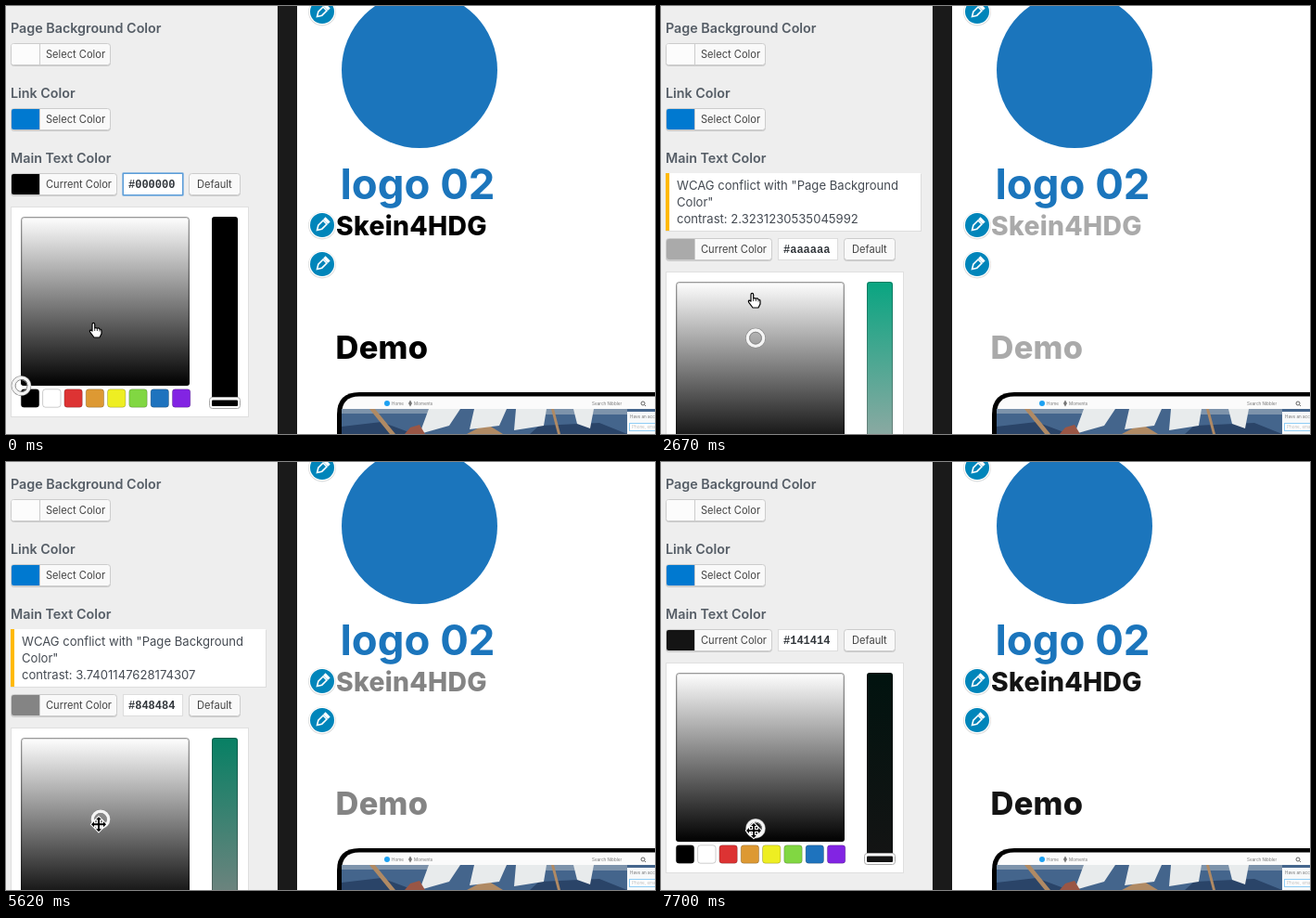
These frames come from a looping animation (700 px wide and 461 px high, 8000 ms). An HTML page:

```html
<!DOCTYPE html>
<html>
<head>
<meta charset="utf-8">
<title>Colour picker contrast check</title>
<style>
html, body { margin: 0; width: 100%; height: 100%; overflow: hidden; background: #fff; }
svg { display: block; }
text { font-family: Inter, "Open Sans", sans-serif; white-space: pre; }
.label { font-size: 14.3px; font-weight: 600; fill: #555d66; }
.btn { font-size: 11.1px; fill: #444; }
.note { font-size: 13.1px; fill: #444a52; }
.title { font-weight: 800; letter-spacing: .3px; }
.tiny { font-size: 4.6px; fill: #777; }
#hex { font: bold 12px "Liberation Mono", monospace; fill: #32373c; }
</style>
</head>
<body>
<svg width="700" height="461" viewBox="0 0 700 461">
  <defs>
    <linearGradient id="grey" x2="0" y2="1">
      <stop stop-color="#fff"/><stop offset="1"/>
    </linearGradient>
    <linearGradient id="sat" x2="0" y2="1">
      <stop id="satTop"/><stop id="satEnd" offset="1"/>
    </linearGradient>
    <clipPath id="noteClip"><rect id="noteBox" x="0" y="179" width="290"/></clipPath>
    <clipPath id="photo"><path d="M362 434H700V461H362Z"/></clipPath>
    <g id="edit">
      <circle r="15" fill="#ddd" cy=".5"/>
      <circle r="14.3" fill="#fff"/>
      <circle r="13" fill="#0085ba"/>
      <g transform="translate(.2 -.2) rotate(45)" fill="none" stroke="#fff" stroke-width="1.6">
        <path d="M-2.8-4V3.4L0 8 2.8 3.4V-4Z"/>
        <path d="M-2.8-5.8V-7.6H2.8V-5.8Z" fill="#fff"/>
      </g>
    </g>
  </defs>

  <path fill="#eee" d="M0 0H293V461H0Z"/>
  <path fill="#ddd" d="M292 0H293V461H292Z"/>
  <path fill="#1a1a1a" d="M293 0H314V461H293Z"/>

  <g id="side"></g>

  <g clip-path="url(#noteClip)">
    <path fill="#ddd" d="M5 181H281V243H5Z"/>
    <path fill="#fff" d="M5 180H280V242H5Z"/>
    <path fill="#ffb900" d="M5 180H9V242H5Z"/>
    <text class="note" x="17" y="198">WCAG conflict with "Page Background</text>
    <text class="note" x="17" y="216">Color"</text>
    <text class="note" x="17" y="234" id="contrast"></text>
  </g>

  <g id="picker">
    <g id="row"></g>
    <rect id="glow" x="125.5" y="179.5" width="66" height="25" rx="1" fill="none" stroke="#5b9dd9" stroke-opacity=".6"/>
    <rect id="input" x="126.5" y="180.5" width="64" height="23" fill="#fff"/>
    <text id="hex" x="132" y="196"></text>
    <path id="caret" d="M183.5 186V199" stroke="#000"/>
    <rect x="5.5" y="216.5" width="256" height="226" fill="#fff" stroke="#dfdfdf"/>
    <rect x="16" y="227" width="182" height="182" rx="3" fill="url(#grey)"/>
    <rect x="16.5" y="227.5" width="181" height="181" rx="3" fill="none" stroke="#000" stroke-opacity=".4"/>
    <rect x="17.5" y="228.5" width="179" height="179" rx="2" fill="none" stroke="#000" stroke-opacity=".12"/>
    <rect x="222" y="227" width="28" height="205" rx="3" fill="url(#sat)"/>
    <rect x="222.5" y="227.5" width="27" height="204" rx="3" fill="none" stroke="#000" stroke-opacity=".25"/>
    <g id="palette"></g>
    <rect x="219.5" y="421.5" width="33" height="12" rx="3" fill="#fff" stroke="#aaa"/>
    <rect id="knob" x="222" y="424.5" width="28" height="6.5" rx="1"/>
    <g id="ring" fill="none">
      <circle r="9.6" stroke="#888" stroke-width="2.4"/>
      <circle r="8.6" stroke="#f4f4f4" stroke-width="3.4"/>
      <circle r="6.4" stroke="#888"/>
    </g>
  </g>

  <circle cx="446" cy="69" r="84" fill="#1b75bc"/>
  <text x="360.5" y="208" font-size="45.5" font-weight="700" fill="#1b75bc">logo 02</text>
  <g id="titles">
    <text class="title" x="356" y="247" font-size="28.3">Skein4HDG</text>
    <text class="title" x="355.5" y="379.5" font-size="34.4">Demo</text>
  </g>
  <use href="#edit" x="341" y="6"/>
  <use href="#edit" x="341" y="236"/>
  <use href="#edit" x="341" y="278"/>

  <path d="M357 461V440Q357 416 381 416H700V461Z"/>
  <path fill="#fbfbfb" d="M362 461V440Q362 420.5 381 420.5H700V461Z"/>
  <circle cx="411" cy="428" r="3" fill="#1da1f2"/>
  <text class="tiny" x="416" y="429.5">Home</text>
  <path fill="#777" d="M434 428 436 424.5 438 428 436 431.5Z"/>
  <text class="tiny" x="440" y="429.5">Moments</text>
  <text class="tiny" x="632" y="429.5">Search Nibbler</text>
  <path d="M688.5 429.5 690 431" stroke="#666"/>
  <circle cx="687" cy="428" r="2" fill="none" stroke="#666"/>
  <g clip-path="url(#photo)">
    <path fill="#44658c" d="M362 434H700V461H362Z"/>
    <path fill="#7d93ab" d="M362 434H460V439H362ZM575 434H670V440H575Z"/>
    <path fill="#2a4468" d="M362 453 405 448 440 461H362ZM575 452 640 449 670 461H565Z"/>
    <path fill="#b08a64" d="M398 434 420 461H414L392 434ZM497 461 518 450 536 461ZM588 434H591L598 461H595Z"/>
    <path fill="#e8ebec" d="M456 434H490L478 452 446 461ZM505 434H540L532 452 500 456ZM550 434H583L580 452 548 457ZM612 434H634L630 455 616 450Z"/>
    <path fill="#9a5645" d="M436 454 446 451 452 461H430Z"/>
    <path fill="#f7f9fa" d="M670 437H700V461H670Z"/>
  </g>
  <text class="tiny" x="673" y="444">Have an account?</text>
  <rect x="672.5" y="449.5" width="40" height="8" fill="#fff" stroke="#8ecdf5"/>
  <text class="tiny" x="675" y="455" fill-opacity=".5">Phone, email</text>

  <g id="cursor">
    <g id="hand" stroke="#000" stroke-width="1.2" stroke-linejoin="round">
      <path fill="#fff" d="M-4 1V-6Q-4-7.6-2.7-7.6T-1.3-6V-2Q0-3 1.4-1.8 3-2.6 4-1 6-1 6 1V4L4 8H-2L-6.2 2.4Q-7.2.6-6 .1-5 0-4 1Z"/>
      <path d="M-1.3-2V1M1.4-1.8V1M4-1V1.5" stroke-width=".8"/>
    </g>
    <path id="move" stroke="#fff" stroke-width="2" paint-order="stroke" d="M0-8 3-5H1V-1H5V-3L8 0 5 3V1H1V5H3L0 8-3 5H-1V1H-5V3L-8 0-5-3V-1H-1V-5H-3Z"/>
  </g>
</svg>
<script>
const $ = id => document.getElementById(id);
const set = (id, attrs) => {
  for (const key in attrs) $(id).setAttribute(key, attrs[key]);
};

const button = (x, y, w, label, swatch) => `
  <rect x="${x + .5}" y="${y + 1.5}" width="${w - 1}" height="23" rx="3" fill="#ccc" stroke="#ccc"/>
  <rect x="${x + .5}" y="${y + .5}" width="${w - 1}" height="23" rx="3" fill="#f9f9f9" stroke="#ccc"/>
  ${swatch ? `<path ${swatch} d="M${x + 1} ${y + 3}q0-2 2-2h28v22h-28q-2 0-2-2z"/>
  <path stroke="#ccc" d="M${x + 31.5} ${y + 1}v22"/>` : ''}
  <text class="btn" x="${x + (swatch ? 38 : 9)}" y="${y + 16}">${label}</text>`;

$('side').innerHTML =
  ['Page Background Color', 'Link Color', 'Main Text Color']
    .map((s, i) => `<text class="label" x="5" y="${29 + i * 70}">${s}</text>`).join('') +
  button(5, 40, 108, 'Select Color', 'fill="#fcfcfc"') +
  button(5, 110, 108, 'Select Color', 'fill="#0079d0"');
$('row').innerHTML =
  button(5, 180, 115, 'Current Color', 'id="swatch"') + button(197, 180, 56, 'Default');
$('palette').innerHTML =
  ['#000', '#fff', '#d33', '#d93', '#ee2', '#81d742', '#1e73be', '#8224e3']
    .map((c, i) => `<rect x="${16.3 + i * 23.3}" y="412.8" width="19.4" height="19.4" rx="3"
      fill="${c}" stroke="#000" stroke-opacity=".2"/>`).join('');

// Step tracks: [start ms, value...]
const shades = [[0, 0], [1470, 170], [4740, 166], [4890, 161], [5030, 156], [5180, 151],
  [5330, 145], [5480, 138], [5620, 132], [5770, 128], [5910, 124], [6050, 119],
  [6200, 117], [7250, 26], [7400, 20]];
const shifts = [[0, 0], [1620, 6], [1770, 70], [6800, 32], [6950, 0]];
const carets = [[0, 0], [150, 1], [600, 0], [1040, 1], [1470, 0]];
const cursors = [[0, 97, 349, 'hand'], [150, 97, 342, 'hand'], [450, 98, 333, 'hand'],
  [600, 99, 322, 'hand'], [750, 100, 311, 'hand'], [890, 101, 301, 'hand'],
  [1040, 102, 294, 'hand'], [1180, 101, 290, 'hand'], [1470, 101, 289, 'move'],
  [1770, 101, 296, 'hand'], [2670, 101, 317, 'hand'], [2820, 103, 330, 'hand'],
  [2960, 104, 343, 'hand'], [3110, 101, 354, 'hand'], [3250, 99, 359, 'move'],
  [3990, 98, 361, 'move'], [4140, 100, 361, 'move'], [4290, 101, 359, 'move'],
  [4440, 100, 362, 'move'], [4740, 100, 0, 'move'], [6650, 102, 406, 'hand'],
  [7250, 102, 394, 'move'], [7400, 102, 397, 'move'], [7700, 100, 397, 'move']];

const at = (track, t) => track.findLast(step => step[0] <= t).slice(1);
const contrast = shade => {
  const s = shade / 255;
  return 1.05 / (((s + .055) / 1.055) ** 2.4 + .05);
};

function draw(t) {
  const [shade] = at(shades, t), [shift] = at(shifts, t), [caret] = at(carets, t);
  const [x, y, kind] = at(cursors, t);
  const hex = '#' + shade.toString(16).padStart(2, '0').repeat(3);
  const ringY = 227 + 182 * (1 - shade / 255);
  const focused = t < 1470;

  for (const id of ['swatch', 'knob', 'titles']) set(id, { fill: hex });
  $('hex').textContent = hex;
  set('satTop', { 'stop-color': `rgb(${[.05, .97, .76].map(k => k * shade)})` });
  set('satEnd', { 'stop-color': hex });
  set('input', { stroke: focused ? '#5b9dd9' : '#ddd' });
  set('glow', { opacity: +focused });
  set('caret', { opacity: caret });
  set('ring', { transform: `translate(${shade ? 102 : 16.5} ${ringY})` });
  set('picker', { transform: `translate(0 ${shift})` });

  // The last failing shade keeps its message until the notice closes.
  $('contrast').textContent = 'contrast: ' + contrast(Math.max(shade, 119));
  set('noteBox', { height: Math.max(0, shift - 6) });

  set('cursor', { transform: `translate(${x} ${y || ringY + shift + 5.5})` });
  for (const id of ['hand', 'move']) set(id, { display: id === kind ? 'inline' : 'none' });
}

const start = performance.now();
function tick() {
  draw((performance.now() - start) % 8000);
  requestAnimationFrame(tick);
}
tick();
</script>
</body>
</html>
```
